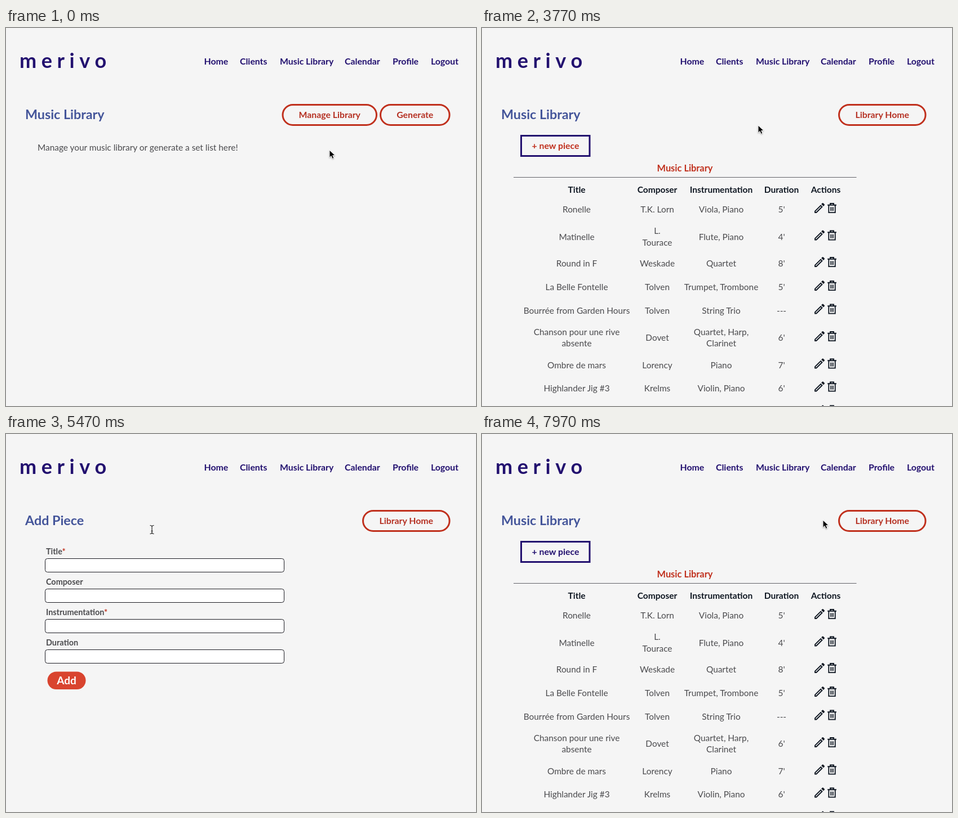
Write an HTML page that moves like this. It is 834 px wide and 672 px high and loops after 8 s.

```html
<!DOCTYPE html>
<html lang="en">
<head>
<meta charset="utf-8">
<title>Music Library</title>
<style>
  html, body { margin: 0; width: 834px; height: 672px; overflow: hidden; background: #f5f5f5; }
  svg { display: block; font-family: Lato, "Open Sans", sans-serif; }
  .bold { font-weight: 700; }
  .mid { text-anchor: middle; }
</style>
</head>
<body>
<svg id="stage" width="834" height="672" viewBox="0 0 834 672"></svg>
<script>
const LOOP = 8000, VIEW = 672, CONTENT = 823, MAX_SCROLL = CONTENT - VIEW;
const NAVY = '#22106f', RED = '#c0301d', INK = '#0f1722', BLUE = '#44559a', GRAY = '#4b4b4e';
const RED_RGB = [181, 48, 34];

const text = (s, x, y, { size = 15.4, fill = GRAY, cls = '', extra = '' } = {}) =>
  `<text x="${x}" y="${y}" font-size="${size}" fill="${fill}" class="${cls}" ${extra}>${s}</text>`;
const bold = (s, x, y, fill, size = 15.8, cls = '') => text(s, x, y, { size, fill, cls: 'bold ' + cls });
const heading = s => bold(s, 34, 162, BLUE, 23.3);

// One or two lines, centred on a row
const cell = (s, x, y) => {
  const lines = s.split('|');
  return lines.map((line, i) =>
    text(line, x, y + 5.5 + (i - (lines.length - 1) / 2) * 20.5, { cls: 'mid' })).join('');
};

const nav = [['Home', 351.5], ['Clients', 415], ['Music Library', 486], ['Calendar', 601],
             ['Profile', 686], ['Logout', 754]];
const header = text('merivo', 24, 71, { size: 36, fill: NAVY, cls: 'bold', extra: 'letter-spacing="8.6"' })
  + nav.map(([s, x]) => bold(s, x, 64.5, NAVY)).join('');

const columns = [168, 311, 424.5, 531.5, 610];
const pieces = [
  [322.5, 'Ronelle', 'T.K. Lorn', 'Viola, Piano', "5'"],
  [371, 'Matinelle', 'L.|Tourace', 'Flute, Piano', "4'"],
  [418.5, 'Round in F', 'Weskade', 'Quartet', "8'"],
  [460.5, 'La Belle Fontelle', 'Tolven', 'Trumpet, Trombone', "5'"],
  [502, 'Bourrée from Garden Hours', 'Tolven', 'String Trio', '---'],
  [550.5, 'Chanson pour une rive|absente', 'Dovet', 'Quartet, Harp,|Clarinet', "6'"],
  [599, 'Ombre de mars', 'Lorency', 'Piano', "7'"],
  [640, 'Highlander Jig #3', 'Krelms', 'Violin, Piano', "6'"],
  [682, "Si un matin d'avril", '---', 'voice, piano', '4\'45"'],
  [724, 'Ronde en fa', 'Voriet', 'Cello, Piano', "10'"]
];

// Pencil and bin
const icons = y => `<g transform="translate(590 ${y - 11.5})" fill="none" stroke="${INK}" stroke-width="1.9">
  <path d="M1 14.7 11.1 4.6 13.4 6.9 3.3 17H1Z"/>
  <path d="M12.1 2.1 14 .3Q14.7-.2 15.4.3L17.7 2.6Q18.2 3.3 17.7 4L15.9 5.9Z" fill="${INK}" stroke="none"/>
  <path d="M23.2 3.8H38.8M28 3.5V1H34V3.5M25.3 4V17.1H36.7V4M29.3 7.2V14.2M32.7 7.2V14.2"/></g>`;

const row = ([y, ...cells]) => cells.map((s, i) => cell(s, columns[i], y)).join('') + icons(y);

const titles = ['Title', 'Composer', 'Instrumentation', 'Duration', 'Actions'];
const listPage = linkColor => heading('Music Library')
  + `<rect x="69.5" y="191.5" width="121.5" height="36" fill="none" stroke="${NAVY}" stroke-width="3"/>`
  + bold('+ new piece', 130.5, 214.5, linkColor, 15.8, 'mid')
  + bold('Music Library', 360, 254.5, RED, 16.4, 'mid')
  + '<path d="M56 265.5H664.5" stroke="#626268"/>'
  + titles.map((s, i) => bold(s, columns[i], 292.5, INK, 15.5, 'mid')).join('')
  + pieces.map(row).join('');

const field = (s, i) => {
  const y = 54 * i, star = i % 2 ? '' : `<tspan fill="${RED}">*</tspan>`;
  return bold(s + star, 71, 213.5 + y, GRAY, 14.4)
    + `<rect x="69.5" y="${221.5 + y}" width="424" height="24" rx="4" fill="#fff" stroke="#1b1b22"/>`;
};

const pages = {
  home: heading('Music Library') + text('Manage your music library or generate a set list here!', 56, 217.5),
  list: listPage(RED),
  visitedList: listPage(NAVY),
  add: heading('Add Piece') + titles.slice(0, 4).map(field).join('')
    + '<rect x="73.5" y="422.5" width="68" height="31.5" rx="15.75" fill="#d9442f"/>'
    + bold('Add', 107.5, 444.5, '#fff', 19, 'mid')
};

// [start time, page]
const visits = [[0, 'home'], [2720, 'list'], [5030, 'add'], [6560, 'home'], [7800, 'visitedList']];

// [time, x, y]
const pointerPath = [
  [0, 574, 217], [1600, 574, 217], [1630, 574, 218], [1830, 574, 218], [2170, 570, 188],
  [2600, 558, 154], [3170, 558, 154], [3600, 490, 173], [4200, 490, 173], [4600, 130, 56],
  [5030, 130, 56], [5470, 259, 170], [5950, 688, 153], [6110, 692, 152], [7270, 692, 152],
  [7560, 605, 153], [LOOP, 605, 153]
];

const ramp = (t, a, b) => {
  const u = Math.min(1, Math.max(0, (t - a) / (b - a)));
  return u * u * (3 - 2 * u);
};

function pointerAt(t) {
  const i = pointerPath.findIndex(p => p[0] > t);
  const [t0, x0, y0] = pointerPath[i - 1], [t1, x1, y1] = pointerPath[i];
  const u = ramp(t, t0, t1);
  return [x0 + (x1 - x0) * u, y0 + (y1 - y0) * u];
}

// Pill whose label grows by a tenth and whose body fills as hover goes from 0 to 1
const pillWidth = (labelWidth, hover) => labelWidth * (1 + hover / 10) + 62;
function pill(label, labelWidth, right, hover) {
  const w = pillWidth(labelWidth, hover), h = 39 + 2 * hover;
  const color = `rgb(${RED_RGB.map(c => c + (255 - c) * hover)})`;
  return `<rect x="${right - w + 1.5}" y="${156 - h / 2}" width="${w - 3}" height="${h - 3}" rx="${(h - 3) / 2}"
    fill="${RED}" fill-opacity="${hover}" stroke="${RED}" stroke-width="3"/>`
    + bold(label, right - w / 2, 160 + hover * 0.5, color, 15.8 * (1 + hover / 10), 'mid');
}

function buttons(page, t) {
  const right = 788.5;
  if (page !== 'home') {
    return pill('Library Home', 94.5, right, page === 'add' ? ramp(t, 5830, 6130) : 0);
  }
  const generate = ramp(t, 6580, 6900) - ramp(t, 7280, 7600);
  const manage = t < 5000 ? ramp(t, 2300, 2600) : ramp(t, 7280, 7600);
  return pill('Manage Library', 107.5, right - pillWidth(63.5, generate) - 4, manage)
    + pill('Generate', 63.5, right, generate);
}

const arrow = '<path d="M0 0V13.4L3.1 10.5 5.2 15.4 7.8 14.3 5.7 9.5H10Z" fill="#000" stroke="#fff" style="filter:drop-shadow(0 1px 1px #0005)"/>';
const iBeam = '<path d="M-3.5-7.5Q0-7.5 0-5V5Q0 7.5-3.5 7.5M3.5-7.5Q0-7.5 0-5V5Q0 7.5 3.5 7.5M-1.5 2.5H1.5" fill="none" stroke="#111" stroke-width="1.1"/>';

const stage = document.getElementById('stage');
stage.innerHTML = `<g id="view">${header}`
  + Object.entries(pages).map(([id, body]) => `<g id="${id}">${body}</g>`).join('')
  + '<g id="pills"></g></g>'
  + `<rect id="thumb" x="829" width="5" height="${VIEW * VIEW / CONTENT}" fill="#7f7f7f"/><g id="pointer"></g>`;
const part = id => document.getElementById(id);

function draw(now) {
  const t = now % LOOP;
  const page = visits.filter(v => v[0] <= t).pop()[1];
  const scroll = page === 'list' ? Math.round(MAX_SCROLL * ramp(t, 3782, 4232)) : 0;
  for (const id in pages) part(id).style.display = id === page ? '' : 'none';
  part('view').setAttribute('transform', `translate(0 ${-scroll})`);
  part('pills').innerHTML = buttons(page, t);
  part('thumb').setAttribute('y', Math.floor(scroll * VIEW / CONTENT) - 1);
  part('thumb').style.display = scroll ? '' : 'none';
  part('pointer').innerHTML = t > 5380 && t < 5640 ? iBeam : arrow;
  part('pointer').setAttribute('transform', `translate(${pointerAt(t)})`);
}

const start = performance.now();
function tick() {
  draw(performance.now() - start);
  requestAnimationFrame(tick);
}
tick();
</script>
</body>
</html>
```
